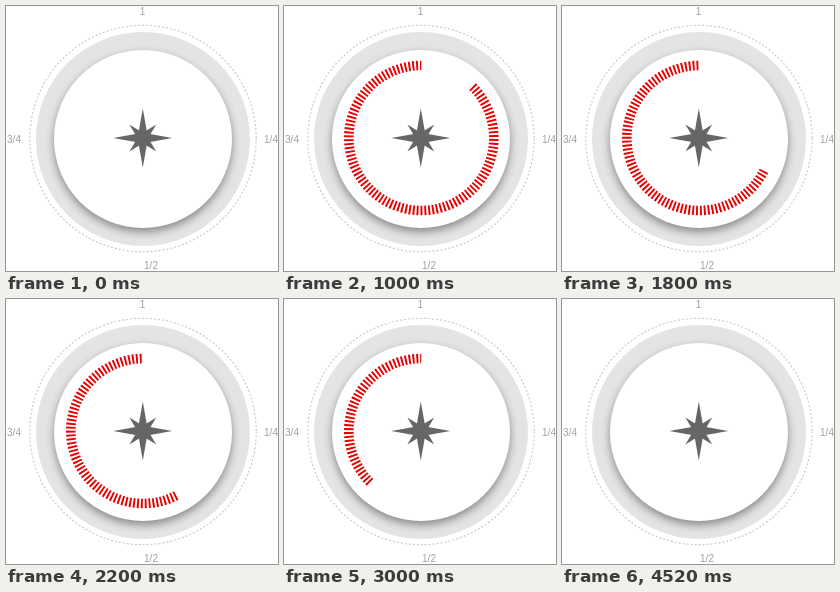
An HTML page with a canvas that plays this animation: 272 by 265 pixels, repeating every 5000 ms.

```html
<!DOCTYPE html>
<html lang="en">
<head>
<meta charset="utf-8">
<title>Dial timer</title>
<style>
  html, body { margin: 0; width: 100%; height: 100%; overflow: hidden; background: #fff; }
  canvas { display: block; width: 272px; height: 265px; }
</style>
</head>
<body>
<canvas id="dial" width="272" height="265"></canvas>
<script>
const W = 272, H = 265, TAU = Math.PI * 2;
const LOOP = 5000, STEP = 40;
const FILL_END = 500, DRAIN_END = 4500;
const RADIUS = 72.5, DASHES = 118.3;
const ctx = document.getElementById('dial').getContext('2d');

const face = document.createElement('canvas');
face.width = W;
face.height = H;

const clamp = v => Math.min(1, Math.max(0, v));

function disc(c, x, y, r, fill) {
  c.beginPath();
  c.arc(x, y, r, 0, TAU);
  c.fillStyle = fill;
  c.fill();
}

function drawRing(c) {
  const x = 137, y = 133;
  c.save();
  disc(c, x, y, 107, '#e4e4e4');
  c.clip();
  c.shadowColor = 'rgba(0,0,0,0.4)';
  c.shadowBlur = 9;
  c.shadowOffsetY = 4;
  disc(c, x, y, 89, '#fff');
  c.restore();

  c.beginPath();
  c.arc(137, 132.5, 113.2, 0, TAU);
  c.setLineDash([2, 2]);
  c.strokeStyle = '#cbcbcb';
  c.lineWidth = 1.2;
  c.stroke();
  c.setLineDash([]);
}

function drawPoint(c, angle, length, waist) {
  c.save();
  c.translate(136.8, 132);
  c.rotate(angle);
  c.beginPath();
  c.moveTo(0, 0);
  c.lineTo(-waist, -waist);
  c.lineTo(0, -length);
  c.lineTo(waist, -waist);
  c.closePath();
  c.fillStyle = '#666';
  c.fill();
  c.restore();
}

function drawStar(c) {
  for (let i = 0; i < 4; i++) {
    drawPoint(c, (i + 0.5) * TAU / 4, 19, 3.8);
    drawPoint(c, i * TAU / 4, 29.5, 4.4);
  }
}

function drawLabels(c) {
  c.font = '10px "Liberation Sans", Arial, sans-serif';
  c.fillStyle = '#a0a0a0';
  c.textAlign = 'center';
  [['1', 136.5, 9], ['1/4', 265, 137], ['1/2', 145, 263], ['3/4', 8, 137]]
    .forEach(([text, x, y]) => c.fillText(text, x, y));
}

function drawFace(c) {
  c.fillStyle = '#fff';
  c.fillRect(0, 0, W, H);
  drawRing(c);
  drawStar(c);
  drawLabels(c);
}

// Dashes always begin at the trimmed start of the arc.
function drawTicks(from, to) {
  if (to <= from) return;
  const top = -TAU / 4;
  const dash = TAU * RADIUS / DASHES / 2;
  ctx.beginPath();
  ctx.arc(137.3, 132, RADIUS, top + from * TAU, top + to * TAU);
  ctx.setLineDash([dash, dash]);
  ctx.strokeStyle = '#e60000';
  ctx.lineWidth = 9.6;
  ctx.stroke();
}

function frame(now) {
  const time = Math.floor((now % LOOP) / STEP) * STEP;
  const end = clamp(time / FILL_END);
  const start = clamp((time - FILL_END) / (DRAIN_END - FILL_END));
  ctx.drawImage(face, 0, 0);
  drawTicks(start, end);
}

drawFace(face.getContext('2d'));
const begin = performance.now();
function tick() {
  frame(performance.now() - begin);
  requestAnimationFrame(tick);
}
tick();
</script>
</body>
</html>
```
